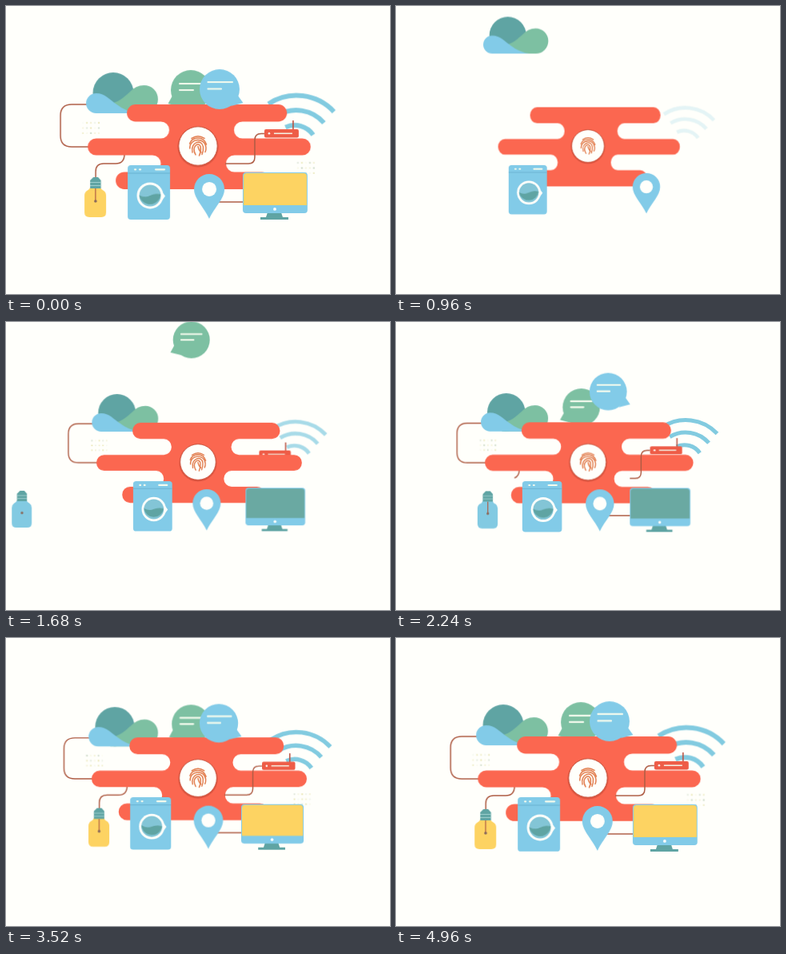
Recreate the animation shown at these times as an HTML page. Size 480 px wide and 360 px high, loop 5000 ms.

```html
<!DOCTYPE html>
<html lang="en">
<head>
<meta charset="utf-8">
<title>Smart home</title>
<style>
  html, body { margin: 0; width: 100%; height: 100%; overflow: hidden; background: #fffffb; }
  svg { display: block; width: 100%; height: 100%; }

  /* Every part shares one 5 s clock; the loop restarts 40 ms after load. */
  .a { animation: 5s cubic-bezier(.4, 0, .2, 1) -4960ms infinite both; transform-origin: 240px 175px; }
  .lin { animation-timing-function: linear; }

  #scene { animation-name: zoom; }
  #left { animation-name: settleLeft; }
  #low { animation-name: settleLow; }
  #blob { animation-name: flatten; }
  #blobX { animation-name: growX; }
  #blobY { animation-name: growY; }
  #print { animation-name: grow; }
  #washer { animation-name: washer; }
  #pin { animation-name: pin; }
  #cloud { animation-name: cloud; }
  #monitor { animation-name: monitor; }
  #green { animation-name: green; }
  #blue { animation-name: blue; }
  #bulb { animation-name: bulb; }
  #router { animation-name: router; }
  #wifi { animation-name: wifiZoom; transform-origin: 437px 179px; }
  #arcs { animation-name: wifiFade; }
  #screen { animation-name: screen; }
  #glass { animation-name: glass; }
  #filament { animation-name: filament; }
  #loopWire { animation-name: loopWire; }
  #screenWire { animation-name: screenWire; }
  #routerWire { animation-name: routerWire; }
  #bulbWire { animation-name: bulbWire; }
  #dotsL { animation-name: dotsL; }
  #dotsR { animation-name: dotsR; }

  #sway { animation: sway 78.125ms ease-in-out -39.06ms infinite alternate; }
  #water { animation: rock 500ms ease-in-out infinite alternate; transform-origin: 180px 237px; }
  .dot { animation: twinkle 500ms linear infinite alternate; }

  @keyframes zoom { from { transform: scale(.882) } to { transform: none } }
  @keyframes settleLeft { from { transform: translateX(-6px) } to { transform: none } }
  @keyframes settleLow { from { transform: translateY(3px) } to { transform: none } }
  @keyframes flatten { from { transform: scaleY(1.04) } to { transform: none } }
  @keyframes growX { 0% { transform: scaleX(0) } 29%, to { transform: none } }
  @keyframes growY { 0% { transform: scaleY(0) } 12%, to { transform: none } }
  @keyframes grow { 0% { transform: scale(0) } 27%, to { transform: none } }
  @keyframes washer { 0%, 1.6% { transform: translateX(-240px) } 27.6%, to { transform: none } }
  @keyframes pin { 0%, 6.7% { transform: translateX(305px) } 29.7%, to { transform: none } }
  @keyframes cloud { 0%, 10.4% { transform: translateY(-165px) } 34%, to { transform: none } }
  @keyframes monitor { 0%, 15.2% { transform: translateX(260px) } 38%, to { transform: none } }
  @keyframes green { 0%, 26.2% { transform: translateY(-152px) } 48.2%, to { transform: none } }
  @keyframes blue { 0%, 31% { transform: translateY(-152px) } 54%, to { transform: none } }
  @keyframes bulb { 0%, 26.8% { transform: translateX(-152px) } 49.6%, to { transform: none } }
  @keyframes router {
    0%, 25.9% { transform: translateY(22px); opacity: 0 }
    26% { transform: translateY(22px); opacity: 1 }
    40%, to { transform: none; opacity: 1 }
  }
  @keyframes wifiZoom { from { transform: scale(.81) } to { transform: none } }
  @keyframes wifiFade { 0%, 12% { opacity: 0 } 42%, to { opacity: 1 } }
  @keyframes screen { 0%, 54.4% { fill: #6aa9a2 } 64.4%, to { fill: #fdd362 } }
  @keyframes glass { 0%, 59.2% { fill: #82cae2 } 69.2%, to { fill: #fdd362 } }
  @keyframes filament { 0%, 38% { opacity: 0 } 44%, to { opacity: 1 } }
  @keyframes loopWire {
    0%, 21% { stroke-dasharray: 0 100; stroke-dashoffset: -50 }
    37%, to { stroke-dasharray: 100 100; stroke-dashoffset: 0 }
  }
  @keyframes screenWire { 0%, 36% { stroke-dashoffset: 100 } 45%, to { stroke-dashoffset: 0 } }
  @keyframes routerWire { 0%, 38% { stroke-dashoffset: 100 } 51%, to { stroke-dashoffset: 0 } }
  @keyframes bulbWire { 0%, 41% { stroke-dashoffset: 100 } 53%, to { stroke-dashoffset: 0 } }
  @keyframes dotsL { 0%, 28% { opacity: 0 } 33%, to { opacity: 1 } }
  @keyframes dotsR { 0%, 48% { opacity: 0 } 53%, to { opacity: 1 } }
  @keyframes sway { from { transform: translateX(-2.2px) } to { transform: translateX(2.2px) } }
  @keyframes rock { from { transform: rotate(-3deg) } to { transform: rotate(3deg) } }
  @keyframes twinkle { from { opacity: .1 } to { opacity: 1 } }

  .wire { fill: none; stroke: #ae5c44; stroke-width: 1.5; stroke-dasharray: 100 100; }
  .line { fill: none; stroke: #f4fbee; stroke-width: 2.2; stroke-linecap: round; }
  .red { fill: #fb6750; }
  .sky { fill: #82cbe8; }
  .teal { fill: #5fa4a3; }
  .leaf { fill: #7dc0a2; }
  .white { fill: #fffffb; }
</style>
</head>
<body>
<svg viewBox="0 0 480 360">
  <g id="scene" class="a lin">
    <g id="left" class="a lin">
      <path id="loopWire" class="a wire" pathLength="100" d="M112 176H82q-14 0-14-14V137q0-14 14-14H106"/>
      <g id="cloud" class="a">
        <circle class="teal" cx="134" cy="108.500" r="25.500"/>
        <path class="leaf" d="M172.500 99a17.500 17.500 0 0 1 0 35H128L134 121c8-2 13-7 20-13q8-9 18.500-9z"/>
        <path class="sky" d="M112.500 134a12.500 12.500 0 0 1 0-25c11 0 17 8 26 14q10 8 25 11z"/>
      </g>
    </g>
    <g id="dotsL" class="a"></g>
    <g id="dotsR" class="a"></g>

    <g id="green" class="a">
      <path class="leaf" d="M208 112L202.500 122 218 126z"/>
      <circle class="leaf" cx="231" cy="105" r="25"/>
      <path class="line" d="M217 97H245M217 105H234"/>
    </g>

    <g id="wifi" class="a lin">
      <g id="arcs" class="a lin" fill="none" stroke="#82cbe0" stroke-width="6">
        <path d="M328 122.200A64 64 0 0 1 410 132"/>
        <path d="M339 136.800A46 46 0 0 1 397.500 146"/>
        <path d="M349.300 151.500A28 28 0 0 1 384 161"/>
      </g>
    </g>

    <g id="router" class="a">
      <path d="M359 143V155" stroke="#b9503f" stroke-width="1.600"/>
      <rect fill="#ee5c47" x="323" y="154" width="43" height="10.500" rx="2"/>
      <circle class="white" cx="329" cy="159.300" r="1.300"/>
      <path d="M335 159.300H358" stroke="#f4fbee" stroke-width="1.500"/>
    </g>

    <path id="bulbWire" class="a wire" pathLength="100" d="M148 185q0 12-11 12H122q-10 0-10 10V216"/>

    <g id="blob" class="a lin"><g id="blobY" class="a"><g id="blobX" class="a">
      <path class="red" d="M161.750 123H340.500a10.750 10.750 0 0 1 0 21.500H295.500a10.500 10.500 0 0 0 0 21H370.500a10.500 10.500 0 0 1 0 21H285.500a10.500 10.500 0 0 0 0 21H320a10.750 10.750 0 0 1 0 21.500H147.750a10.750 10.750 0 0 1 0-21.500H183a10.500 10.500 0 0 0 0-21H112.500a10.500 10.500 0 0 1 0-21H193.500a10.500 10.500 0 0 0 0-21H161.750a10.750 10.750 0 0 1 0-21.500z"/>
    </g></g></g>

    <path id="routerWire" class="a wire" pathLength="100" d="M323 159.500H319q-8 0-8 8V189q0 8-8 8H274"/>

    <g id="blue" class="a">
      <path class="sky" d="M290 112L296.500 121 281 125z"/>
      <circle class="sky" cx="267" cy="104" r="25"/>
      <path class="line" d="M252.500 95H283M252.500 103.500H269"/>
    </g>

    <g id="print" class="a">
      <circle cx="240" cy="176" r="25.600" fill="#b8402f" opacity=".45"/>
      <circle class="white" cx="240" cy="175" r="24.200" stroke="#c8553f" stroke-width=".9"/>
      <g fill="none" stroke="#e27c4c" stroke-width="1.500" stroke-linecap="round">
        <path d="M232 165.500Q240 160 248 165.500"/>
        <path d="M229.500 172C233 162.500 247 162.500 250.500 173"/>
        <path d="M229.800 178C229 165 249 163.500 250 177Q250.200 180 249 182.500"/>
        <path d="M233 183C230 170 245 165.500 246.500 176Q247 181 245 185.500"/>
        <path d="M237 186C231 175 241.500 169 243.200 176Q244 182 241.500 187"/>
        <path d="M240 175.500Q241 181 244 183"/>
      </g>
    </g>

    <g id="bulb" class="a">
      <path id="glass" class="a lin" d="M105 227H118q1 3 4 4 3 2 3 6V258q0 6-6 6H104q-6 0-6-6V237q0-4 3-6 3-1 4-4z"/>
      <path class="teal" d="M109 214H115L118.500 218V228H105V218z"/>
      <path d="M105 220.500H118.500M105 224.500H118.500" stroke="#9fd0cf"/>
      <path id="filament" class="a" d="M111.800 228V244" stroke="#ae5c44" stroke-width="1.200"/>
      <circle cx="111.800" cy="244" r="1.800" fill="#8a6a5c"/>
    </g>

    <g id="low" class="a lin">
      <path id="screenWire" class="a wire" pathLength="100" d="M300 245H258"/>

      <g id="washer" class="a">
        <rect class="sky" x="152" y="199" width="53" height="68" rx="4"/>
        <path d="M152 209H205" stroke="#6bb4d2"/>
        <path class="line" d="M161 204.300H162M167 204.300H168M187 204.300H198"/>
        <path class="white" d="M195 232L199 237.500 195 243z"/>
        <circle class="white" cx="180" cy="237" r="16.500"/>
        <circle fill="#83c5d6" cx="180" cy="237" r="13.500"/>
        <path id="water" class="teal" d="M166.600 236q7 4 13.400 1t13.400-1a13.500 13.500 0 0 1-26.800 0z"/>
      </g>

      <g id="pin" class="a"><g id="sway">
        <path class="sky" d="M254 210a19 19 0 0 1 19 19c0 12-12 22-19 37-7-15-19-25-19-37a19 19 0 0 1 19-19z"/>
        <circle class="white" cx="254" cy="229" r="9"/>
      </g></g>

      <g id="monitor" class="a">
        <path class="teal" d="M327 258H344L346 264H353V267H318V264H325z"/>
        <rect class="sky" x="296" y="208" width="81" height="51" rx="4"/>
        <path id="screen" class="a lin" d="M301 209H372q4 0 4 4V249H297V213q0-4 4-4z"/>
        <circle class="white" cx="336" cy="254" r="1.900"/>
      </g>
    </g>
  </g>
</svg>
<script>
  // Two small fields of twinkling specks.
  function specks(id, x, y, seed) {
    const g = document.getElementById(id);
    for (let i = 0; i < 15; i++) {
      const d = document.createElementNS("http://www.w3.org/2000/svg", "circle");
      d.setAttribute("class", "dot");
      d.setAttribute("cx", x + (i % 5) * 5);
      d.setAttribute("cy", y + Math.floor(i / 5) * 6.5);
      d.setAttribute("r", .9);
      d.setAttribute("fill", i % 3 ? "#dcd78c" : "#a9bfa4");
      d.style.animationDelay = -((i * 370 + seed) % 1000) + "ms";
      g.append(d);
    }
  }
  specks("dotsL", 96, 146, 0);
  specks("dotsR", 365, 196, 240);
</script>
</body>
</html>
```
